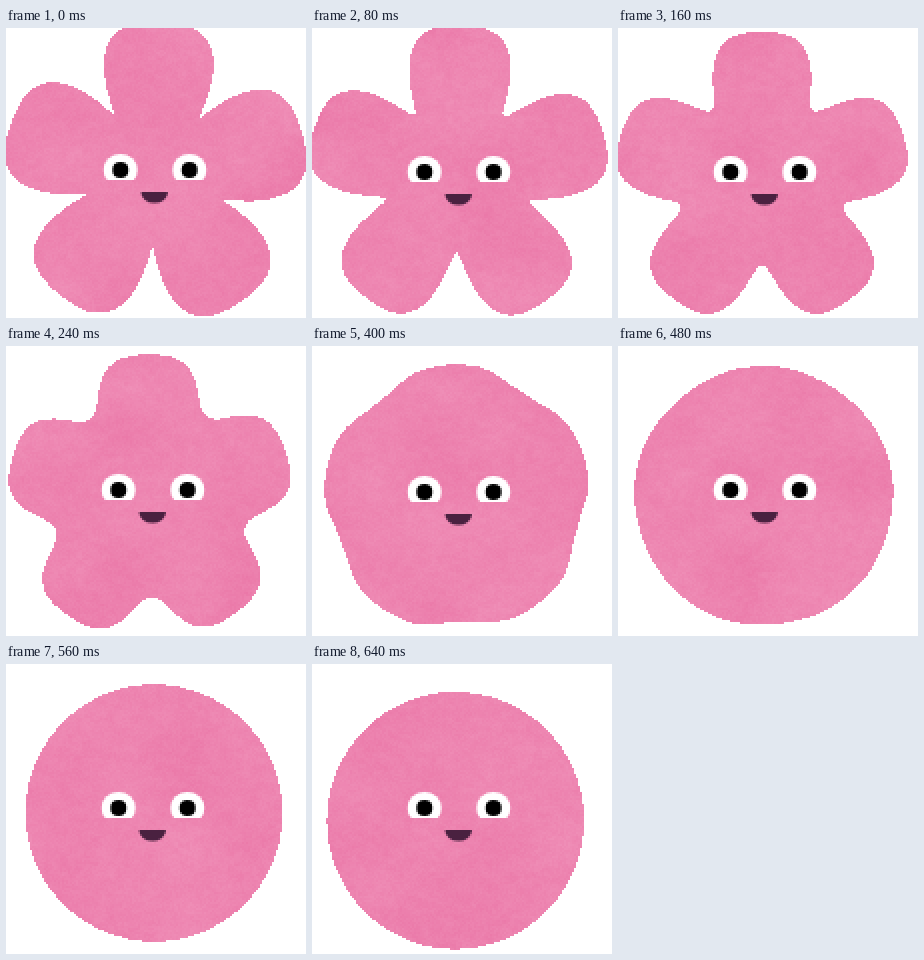
Recreate the animation shown at these times as an HTML page with a canvas. Size 300 by 290 pixels, loop 0.72 s.

```html
<!DOCTYPE html>
<html lang="en">
<head>
<meta charset="utf-8">
<title>Flower to circle</title>
<style>
html, body { margin: 0; width: 100%; height: 100%; overflow: hidden; background: #fff; }
canvas { display: block; width: 100vw; height: 100vh; image-rendering: pixelated; }
</style>
</head>
<body>
<canvas id="stage" width="150" height="145"></canvas>
<script>
const W = 150, H = 145, STEP = 80, PETALS = 5;
const stage = document.getElementById('stage').getContext('2d');

// Body centre of each pose, with an optional nudge of the face
const poses = [
  { x: 149, y: 147, dx: 2, dy: -2 },
  { x: 146, y: 149 },
  { x: 144, y: 152 },
  { x: 144, y: 152 },
  { x: 145, y: 151 },
  { x: 145, y: 152, dy: 2 },
  { x: 146, y: 150 },
  { x: 148, y: 149 },
  { x: 143.5, y: 156.5 }
];

const lerp = (a, b, t) => a + (b - a) * t;
const smooth = t => { t = Math.min(1, t); return t * t * (3 - 2 * t); };

// Valleys fill up while tips shrink, until both meet in a circle.
function outline({ x, y }, step) {
  const valley = lerp(71, 128.5, smooth(step / 6));
  const tip = lerp(153, 128.5, smooth(step / 7));
  const taper = 1.3 + .7 * step;
  const half = Math.PI / PETALS, top = (-88 - step) * Math.PI / 180;
  const path = new Path2D();
  for (let p = 0; p < PETALS; p++) {
    for (let i = -20; i < 20; i++) {
      const u = i / 20, a = top + (2 * p + u) * half;
      const r = lerp(valley, tip, (1 - u ** 4) ** taper);
      path.lineTo(x + r * Math.cos(a), y + r * Math.sin(a));
    }
  }
  path.closePath();
  return path;
}

function hash(x, y, seed) {
  let h = Math.imul(x, 374761393) ^ Math.imul(y, 668265263) ^ Math.imul(seed + 1, 1274126177);
  h = Math.imul(h ^ (h >>> 13), 1103515245);
  return ((h ^ (h >>> 16)) >>> 0) / 4294967296;
}

function noise(x, y, seed) {
  const i = Math.floor(x), j = Math.floor(y), u = smooth(x - i), v = smooth(y - j);
  const row = k => lerp(hash(i, k, seed), hash(i + 1, k, seed), u);
  return lerp(row(j), row(j + 1), v) - .5;
}

// Hard-edged watercolour fill
function paint(ctx, seed) {
  const img = ctx.getImageData(0, 0, W, H), d = img.data;
  for (let y = 0; y < H; y++) for (let x = 0; x < W; x++) {
    const k = (y * W + x) * 4;
    if (d[k + 3] < 128) { d[k + 3] = 0; continue; }
    const t = noise(x / 30, y / 22, seed) * .35 + noise(x / 4, y / 3, seed + 20) * .2
            + (hash(x, y, seed + 40) - .5) * .2;
    d[k] = 237 - 8 * t;
    d[k + 1] = 132 - 36 * t;
    d[k + 2] = 176 - 24 * t;
    d[k + 3] = 255;
  }
  ctx.putImageData(img, 0, 0);
}

function ellipse(ctx, color, x, y, rx, ry, end = 2 * Math.PI) {
  ctx.fillStyle = color;
  ctx.beginPath();
  ctx.ellipse(x, y, rx, ry, 0, 0, end);
  ctx.fill();
}

function eye(ctx, x, y) {
  ctx.save();
  ctx.beginPath();
  ctx.rect(x - 20, y - 20, 40, 30);
  ctx.clip();
  ellipse(ctx, '#fff', x, y, 17, 16);
  ctx.restore();
  ellipse(ctx, '#000', x, y, 8, 8);
}

function face(ctx, { dx = 0, dy = 0 }) {
  ctx.translate(dx, dy);
  eye(ctx, 112.5, 144);
  eye(ctx, 181.5, 144);
  ellipse(ctx, '#4a2140', 146.5, 166, 13.5, 11, Math.PI);
}

const pictures = poses.map((pose, step) => {
  const canvas = document.createElement('canvas');
  canvas.width = W;
  canvas.height = H;
  const ctx = canvas.getContext('2d', { willReadFrequently: true });
  ctx.scale(.5, .5);
  ctx.fill(outline(pose, step));
  paint(ctx, step);
  face(ctx, pose);
  return canvas;
});

function draw() {
  const i = Math.floor(performance.now() / STEP) % pictures.length;
  stage.fillStyle = '#fff';
  stage.fillRect(0, 0, W, H);
  stage.drawImage(pictures[i], 0, 0);
  requestAnimationFrame(draw);
}
draw();
</script>
</body>
</html>
```
